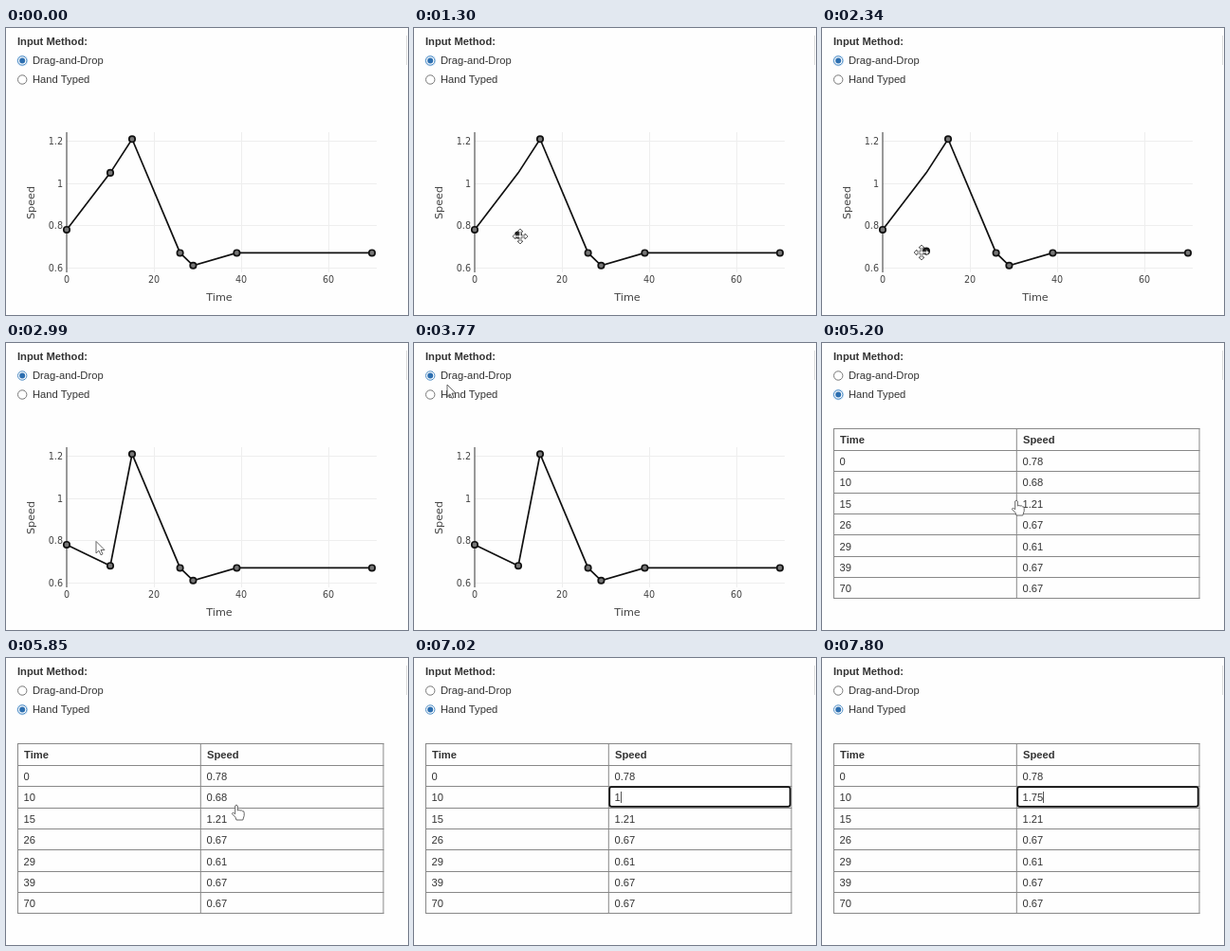
These frames come from a looping animation (424x303 px, 8000 ms). An HTML page with a canvas:

```html
<!DOCTYPE html>
<html lang="en">
<head>
<meta charset="utf-8">
<title>Input method demo</title>
<style>
  html, body { margin: 0; width: 100%; height: 100%; overflow: hidden; background: #fefefe; }
  canvas { display: block; }
</style>
</head>
<body>
<canvas width="424" height="303"></canvas>
<script>
const ctx = document.querySelector('canvas').getContext('2d');
const LOOP = 8000, STEP = 130;
const PICK = 1040, DROP = 2470, SWITCH = 4420, EDIT = 6240, TYPE = 7020;
const SANS = '11.2px "Liberation Sans", Arial, sans-serif';
const PLOT = 'px "DejaVu Sans", Verdana, sans-serif';
const data = [[0, .78], [10, 1.05], [15, 1.21], [26, .67], [29, .61], [39, .67], [70, .67]];
const NEW_SPEED = .68;
const px = time => 64 + time * 4.6;
const py = speed => 253 - (speed - .6) * 222.5;

// Pointer path: time, x, y
const path = [
  [390, 128, 178], [520, 128, 178], [650, 118, 162], [780, 112, 154], [910, 112, 154],
  [1040, 112, 167], [1300, 112, 220], [1560, 109, 232], [1820, 105, 237], [2860, 105, 237],
  [3770, 35, 44], [4030, 33, 51], [4550, 33, 51], [5200, 205, 166], [5330, 205, 166],
  [5850, 243, 155], [6240, 232, 146], [8000, 232, 146]
];

function pointerAt(t) {
  const i = path.findIndex(p => p[0] > t);
  const [t0, x0, y0] = path[i - 1], [t1, x1, y1] = path[i];
  const k = (t - t0) / (t1 - t0);
  return [x0 + (x1 - x0) * k, y0 + (y1 - y0) * k];
}

function text(str, x, y, font = SANS, align = 'left', color = '#333') {
  ctx.font = font;
  ctx.textAlign = align;
  ctx.fillStyle = color;
  ctx.fillText(str, x, y);
}

function line(points, color, width = 1) {
  ctx.beginPath();
  points.forEach(p => ctx.lineTo(...p));
  ctx.strokeStyle = color;
  ctx.lineWidth = width;
  ctx.stroke();
}

function circle(x, y, r, fill, stroke, width = 1) {
  ctx.beginPath();
  ctx.arc(x, y, r, 0, 7);
  if (fill) { ctx.fillStyle = fill; ctx.fill(); }
  if (stroke) { ctx.strokeStyle = stroke; ctx.lineWidth = width; ctx.stroke(); }
}

function radio(y, label, on, focused) {
  if (on && focused) circle(17.2, y, 6, '#cfe2f4');
  circle(17.2, y, 4.7, '#fff', on ? '#4d8cc4' : '#777');
  if (on) circle(17.2, y, 3, '#2d6fb0');
  text(label, 28, y + 3.5);
}

function drawChart(t, pointer) {
  const dragging = t >= PICK && t < DROP;
  for (const v of [20, 40, 60]) line([[px(v) + .5, 110], [px(v) + .5, 258]], '#eee');
  for (const v of [.6, .8, 1, 1.2]) {
    const y = Math.floor(py(v)) + .5;
    line([[64, y], [391, y]], '#eee');
    text(v, 60, y + 3.5, 9.6 + PLOT, 'right', '#444');
  }
  line([[64, 110], [64, 258]], '#555', 1.2);
  for (const v of [0, 20, 40, 60]) text(v, px(v), 269, 9.6 + PLOT, 'center', '#444');
  text('Time', 225, 288, 11.2 + PLOT, 'center', '#444');
  ctx.save();
  ctx.translate(30, 184.5);
  ctx.rotate(-Math.PI / 2);
  text('Speed', 0, 0, 11.2 + PLOT, 'center', '#444');
  ctx.restore();

  const points = data.map(([x, y], i) => [px(x), py(i == 1 && t >= DROP ? NEW_SPEED : y)]);
  line(points, '#111', 1.7);
  points.forEach(([x, y], i) => {
    if (i == 1 && dragging) circle(x, pointer[1] - 1.5, 3.2, '#222', '#111', 1.6);
    else circle(x, y, 3.2, '#777', '#111', 1.7);
  });
}

function typedValue(t) {
  if (t < TYPE) return '0.68';
  return '1.75'.slice(0, t < 7150 ? 1 : t < 7670 ? 2 : t < 7800 ? 3 : 4);
}

function drawTable(t) {
  const rowY = i => 90.9 + i * 22.38;
  for (let i = 0; i < 9; i++) {
    const y = Math.floor(rowY(i)) + .5;
    line([[12, y], [398.5, y]], '#888');
  }
  for (const x of [12.5, 205.3, 398]) line([[x, 90], [x, 270]], '#888');
  text('Time', 19, 106, 'bold ' + SANS);
  text('Speed', 212, 106, 'bold ' + SANS);
  data.forEach(([time, speed], i) => {
    const y = rowY(i + 1) + 15.7;
    text(time, 18.5, y);
    if (i != 1) text(speed.toFixed(2), 211.5, y);
  });
  const value = typedValue(t);
  if (t >= EDIT) {
    ctx.beginPath();
    ctx.roundRect(206.2, 136.2, 190.5, 20.6, 2);
    ctx.fillStyle = '#fff';
    ctx.fill();
    ctx.strokeStyle = '#111';
    ctx.lineWidth = 1.8;
    ctx.stroke();
  }
  text(value, 211.5, rowY(2) + 15.7);
  if (t >= EDIT) {
    const x = Math.floor(212 + ctx.measureText(value).width) + .5;
    line([[x, 141], [x, 153]], '#555');
  }
}

const shapes = {
  arrow: new Path2D('M0 0V12.5L3 9.8L5 14.3L7 13.4L5 9.1H9Z'),
  move: new Path2D('M0-8L3-5H1V-1H5V-3L8 0L5 3V1H1V5H3L0 8L-3 5H-1V1H-5V3L-8 0L-5-3V-1H-1V-5H-3Z'),
  hand: new Path2D('M-1.3 1Q0-1 1.3 1V6Q3 5 4 6Q5.5 5.2 6.3 6.7Q8.2 6.2 8.2 8.5V11.5L6.8 16H0L-1 13.2L-4.5 9.7Q-4.5 7.2-1.3 9.7Z')
};

function drawPointer(t, [x, y]) {
  const shape = shapes[t < 650 ? 'arrow' : t < 2990 ? 'move' : t < 3900 ? 'arrow' : 'hand'];
  ctx.save();
  ctx.translate(x, y);
  ctx.fillStyle = '#fff';
  ctx.fill(shape);
  ctx.strokeStyle = '#555';
  ctx.lineWidth = .9;
  ctx.stroke(shape);
  ctx.restore();
}

function draw(now) {
  const t = Math.floor(now % LOOP / STEP) * STEP;
  const typed = t >= SWITCH;
  const pointer = t >= path[0][0] && t < TYPE ? pointerAt(t) : null;
  ctx.fillStyle = '#fefefe';
  ctx.fillRect(0, 0, 424, 303);
  line([[422.5, 8], [422.5, 39]], '#ddd');
  text('Input Method:', 12, 18, 'bold ' + SANS);
  radio(34.5, 'Drag-and-Drop', !typed, t < DROP);
  radio(54.5, 'Hand Typed', typed, t < EDIT);
  if (typed) drawTable(t);
  else drawChart(t, pointer);
  if (pointer) drawPointer(t, pointer);
  requestAnimationFrame(() => draw(performance.now()));
}
draw(0);
</script>
</body>
</html>
```
